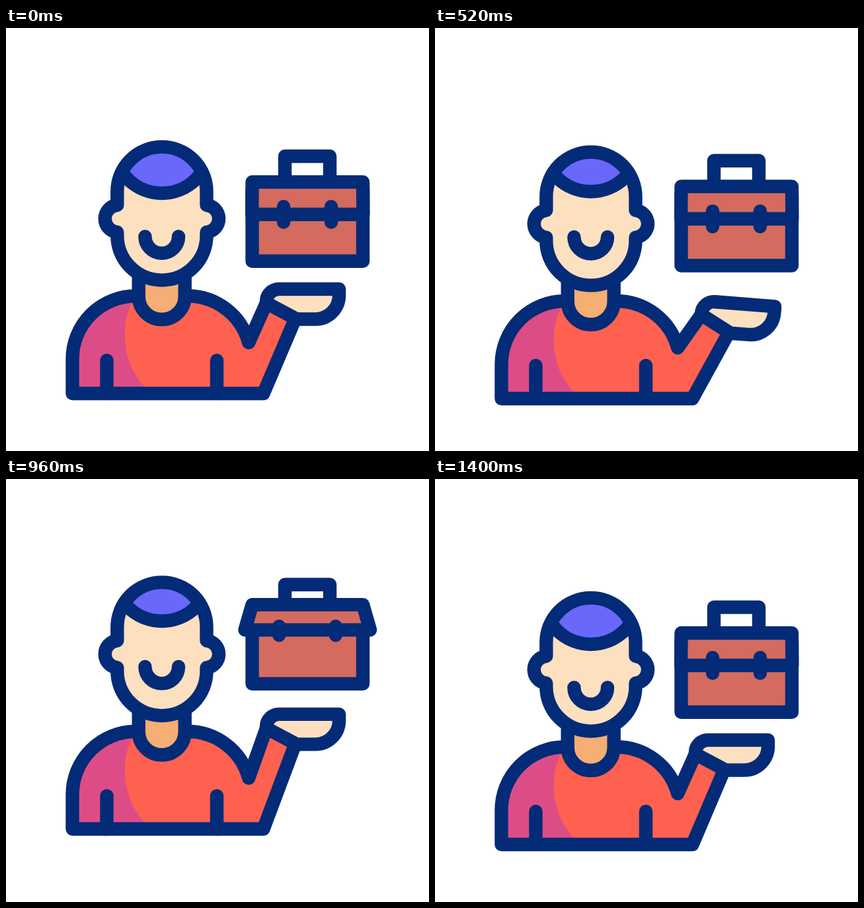
Write an HTML page with a canvas that moves like this. It is 640 by 640 pixels and loops after 1.68 s.

```html
<!DOCTYPE html>
<html lang="en">
<head>
<meta charset="utf-8">
<title>Man with briefcase</title>
<style>
  html, body { margin: 0; width: 100%; height: 100%; overflow: hidden; background: #fff; }
  canvas { display: block; width: 100vmin; height: 100vmin; }
</style>
</head>
<body>
<canvas id="stage" width="640" height="640"></canvas>
<script>
const ctx = document.getElementById('stage').getContext('2d');
const LOOP = 1680, STEP = 40, PI = Math.PI;
const NAVY = '#032b77', SKIN = '#fde0bf', NECK = '#f5ae73', HAIR = '#6a67fb';
const RED = '#ff6150', PINK = '#dc4d87', LEATHER = '#d46b5e';

// Eased track through [time, value] keys.
function track(t, ...keys) {
  if (t <= keys[0][0]) return keys[0][1];
  for (let i = 1; i < keys.length; i++) {
    const [t0, a] = keys[i - 1], [t1, b] = keys[i];
    if (t < t1) {
      const p = (t - t0) / (t1 - t0);
      return a + (b - a) * p * p * (3 - 2 * p);
    }
  }
  return keys[keys.length - 1][1];
}

const jump = (t, height) =>
  track(t, [40, 0], [420, 9.5], [480, 9.5], [800, -height], [870, -height], [1180, 0]);

function paint(path, fill) {
  if (fill) {
    ctx.fillStyle = fill;
    ctx.fill(path);
  }
  ctx.stroke(path);
}

function poly(points, closed) {
  const path = new Path2D();
  points.forEach(([x, y]) => path.lineTo(x, y));
  if (closed) path.closePath();
  return path;
}

function shifted(dy, draw) {
  ctx.save();
  ctx.translate(0, dy);
  draw();
  ctx.restore();
}

function drawTorso(cuffTop, cuffEnd) {
  const shirt = new Path2D();
  shirt.moveTo(100.5, 553);
  shirt.lineTo(100.5, 501);
  shirt.arc(196, 501, 95.5, PI, 1.5 * PI);
  shirt.lineTo(275, 405.5);
  shirt.arc(275, 501, 95.5, -PI / 2, -0.265);
  shirt.lineTo(...cuffTop);
  shirt.lineTo(...cuffEnd);
  shirt.lineTo(389.5, 553);
  shirt.closePath();
  ctx.fillStyle = RED;
  ctx.fill(shirt);

  const shade = new Path2D('M192 413C176 440 170 500 210 543V570H80V400H192Z');
  ctx.save();
  ctx.clip(shirt);
  ctx.fillStyle = PINK;
  ctx.fill(shade);
  ctx.restore();

  paint(shirt);
  for (const x of [152.5, 319]) paint(poly([[x, 503], [x, 553]]));
  paint(new Path2D('M200.7 375V406A35 35 0 0 0 270.7 406V375'), NECK);
}

function drawHand() {
  paint(new Path2D('M394 416V414A19 19 0 0 1 413 395H504V405A36 36 0 0 1 468 440.5H440Z'), SKIN);
}

function drawHead(look) {
  const head = new Path2D(
    'M168.3 268V247.5A67.6 67.6 0 0 1 303.5 247.5V268' +
    'A20.6 20.6 0 0 1 303.5 309V314A67.6 67.6 0 0 1 168.3 314V309' +
    'A20.6 20.6 0 0 1 168.3 268Z');
  ctx.fillStyle = SKIN;
  ctx.fill(head);

  const hair = new Path2D();
  hair.arc(235.9, 177 + look, 73, 0, 2 * PI);
  ctx.save();
  ctx.clip(head);
  paint(hair, HAIR);
  ctx.restore();
  paint(head);

  const smile = new Path2D();
  smile.arc(235.7, 315.5 + look * 0.69, 25.3, 0, PI);
  paint(smile);
}

function drawCase(flare) {
  const lift = flare * 0.8;
  paint(poly([[422, 236 + lift], [422, 194 + lift], [490, 194 + lift], [490, 236 + lift]]));
  paint(poly([[372.5, 245], [540, 245], [540, 352.7], [372.5, 352.7]], true), LEATHER);
  const rim = 282 - flare;
  paint(poly([[372.5, 233], [540, 233], [540.3 + flare, rim], [372.2 - flare, rim]], true), LEATHER);
  for (const [x, side] of [[420, -1], [492, 1]]) {
    const bx = x + side * flare * 0.63;
    paint(poly([[bx, 270.3 - flare * 0.42], [bx, 293.7 - flare * 1.35]]));
  }
}

function render(t) {
  const look = track(t, [240, 0], [640, -13.2], [840, -13.2], [1380, 0]);
  const flare = track(t, [560, 0], [920, 11], [1400, 0]);
  const droop = track(t, [160, 0], [600, 1.04], [914, 0]);
  const raise = track(t, [600, 0], [920, -16], [1340, 0]);

  // The palm turns about its top left corner; the sleeve ends follow it.
  const pose = new DOMMatrix()
    .translate(413 + 11 * droop, 395 + 12 * droop + raise)
    .rotate(4.8 * droop)
    .translate(-413, -395);
  const place = (x, y) => {
    const p = pose.transformPoint({ x, y });
    return [p.x, p.y];
  };

  ctx.fillStyle = '#fff';
  ctx.fillRect(0, 0, 640, 640);
  ctx.strokeStyle = NAVY;
  ctx.lineWidth = 20.4;
  ctx.lineCap = ctx.lineJoin = 'round';

  shifted(jump(t, 29.5), () => {
    drawTorso(place(394, 416), place(438, 439));
    ctx.save();
    ctx.transform(pose.a, pose.b, pose.c, pose.d, pose.e, pose.f);
    drawHand();
    ctx.restore();
    drawHead(look);
  });
  shifted(jump(t, 53.8), () => drawCase(flare));
}

const start = performance.now();
function tick() {
  const t = (performance.now() - start) % LOOP;
  render(Math.floor(t / STEP) * STEP);
  requestAnimationFrame(tick);
}
tick();
</script>
</body>
</html>
```
